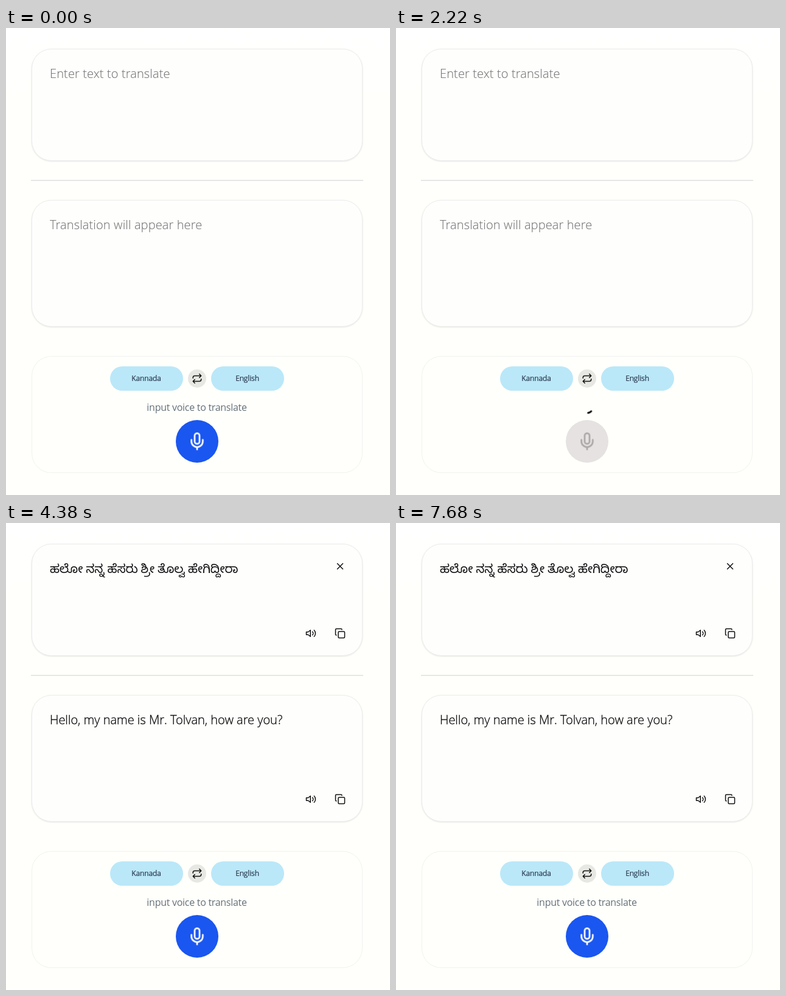
Write an HTML page that moves like this. It is 631 px wide and 766 px high and loops after 7.92 s.

```html
<!DOCTYPE html>
<html lang="en">
<head>
<meta charset="utf-8">
<title>Voice translator</title>
<style>
  html, body { margin: 0; height: 100%; overflow: hidden; background: #fffffc; }
  svg.stage { display: block; width: 631px; height: 766px; background: linear-gradient(#fff, #fffffb 160px); }
  text { font-family: "Open Sans", "Noto Sans", "Noto Sans Kannada", sans-serif; font-weight: 300; font-size: 20px; }
  .box { fill: #fefefd; stroke: #ebebec; filter: drop-shadow(0 1px 1px rgb(0 0 0 / .1)); }
  .panel { fill: none; stroke: #f1f1f0; }
  .hint { fill: #777; stroke: #777; stroke-width: .15; letter-spacing: .12px; }
  .said { fill: #111; stroke: #111; stroke-width: .35; }
  .said:lang(kn) { stroke: none; letter-spacing: -.15px; }
  .prompt { fill: #64717a; font-size: 16px; font-weight: 400; text-anchor: middle; letter-spacing: -.28px; }
  .pill { fill: #bae8f9; }
  .lang { fill: #2c3b50; stroke: #2c3b50; stroke-width: .2; font-size: 12px; font-weight: 400; text-anchor: middle; letter-spacing: -.15px; }
  .icon { fill: none; stroke: #111; stroke-width: 2; stroke-linecap: round; stroke-linejoin: round; }
  #ring { transform-origin: 314px 622px; }
</style>
</head>
<body>
<svg class="stage" viewBox="0 0 631 766">
  <defs>
    <g id="mic"><path d="M12 2a3 3 0 0 0-3 3v7a3 3 0 0 0 6 0V5a3 3 0 0 0-3-3ZM19 10v2a7 7 0 0 1-14 0v-2M12 19v3"/></g>
    <g id="micOff"><path d="M2 2 22 22M18.89 13.23A7.12 7.12 0 0 0 19 12v-2M5 10v2a7 7 0 0 0 12 5M15 9.34V5a3 3 0 0 0-5.68-1.33M9 9v3a3 3 0 0 0 5.12 2.12M12 19v3"/></g>
    <g id="swap"><path d="m17 2 4 4-4 4M3 11v-1a4 4 0 0 1 4-4h14M7 22l-4-4 4-4M21 13v1a4 4 0 0 1-4 4H3"/></g>
    <g id="speaker"><path d="M11 5 6 9H2v6h4l5 4ZM15.54 8.46a5 5 0 0 1 0 7.07M19.07 4.93a10 10 0 0 1 0 14.14"/></g>
    <g id="copy"><rect x="8" y="8" width="14" height="14" rx="2"/><path d="M4 16a2 2 0 0 1-2-2V4a2 2 0 0 1 2-2h10a2 2 0 0 1 2 2"/></g>
    <g id="close"><path d="M18 6 6 18M6 6l12 12"/></g>
  </defs>

  <rect class="box" x="42.5" y="34.5" width="543" height="183" rx="32"/>
  <rect x="41" y="249" width="546" height="2" fill="#e5e6e5"/>
  <rect class="box" x="42.5" y="282.5" width="543" height="207" rx="32"/>
  <rect class="panel" x="42.5" y="538.5" width="543" height="191" rx="32"/>

  <g id="empty">
    <text class="hint" x="72" y="82">Enter text to translate</text>
    <text class="hint" x="72" y="330">Translation will appear here</text>
  </g>
  <g id="result">
    <text class="said" x="72" y="82" lang="kn">ಹಲೋ ನನ್ನ ಹೆಸರು ಶ್ರೀ ತೊಲ್ವ ಹೇಗಿದ್ದೀರಾ</text>
    <text class="said" x="72" y="330">Hello, my name is Mr. Tolvan, how are you?</text>
    <circle id="hover" cx="501" cy="453" r="20" fill="#e3e3e1"/>
    <g id="tools"></g>
  </g>

  <rect class="pill" x="171" y="555" width="120" height="40" rx="20"/>
  <rect class="pill" x="337" y="555" width="120" height="40" rx="20"/>
  <text class="lang" x="230.5" y="579">Kannada</text>
  <text class="lang" x="396.5" y="579">English</text>
  <circle cx="314" cy="575" r="15" fill="#e7e7e3"/>
  <g id="middle"></g>

  <text id="prompt" class="prompt" x="313.5" y="628">input voice to translate</text>
  <g id="dots" fill="#111">
    <circle cx="306" cy="622" r="3"/><circle cx="314" cy="622" r="3"/><circle cx="322" cy="622" r="3"/>
  </g>
  <g id="busy">
    <g id="ring"><circle id="arc" cx="314" cy="622" r="9.5" fill="none" stroke="#111" stroke-width="3" stroke-linecap="round"/></g>
  </g>

  <circle id="button" cx="314" cy="678" r="35"/>
  <g id="micIcon"></g>
  <g id="offIcon"></g>
</svg>
<script>
const LOOP = 7920, LISTEN = 870, WAIT = 2040, DONE = 2460, HOVER = [4380, 5820];
const BLUE = '#1a56f0', RED = '#e61237', GREY = '#e5e2e1', FADE = 150;
const $ = id => document.getElementById(id);

function icon(parent, name, x, y, size = 18) {
  const use = document.createElementNS('http://www.w3.org/2000/svg', 'use');
  use.setAttribute('href', '#' + name);
  use.setAttribute('class', 'icon');
  use.setAttribute('transform', `translate(${x - size / 2} ${y - size / 2}) scale(${size / 24})`);
  $(parent).append(use);
}
icon('tools', 'close', 549, 71);
for (const y of [181, 453]) {
  icon('tools', 'speaker', 501, y);
  icon('tools', 'copy', 549, y);
}
icon('middle', 'swap', 314, 575);
icon('micIcon', 'mic', 314, 678, 32);
icon('offIcon', 'micOff', 314, 678, 32);

// steps: [time, value, easing to the next step]
function track(el, prop, steps) {
  const all = [[0, steps[0][1]], ...steps, [LOOP, steps.at(-1)[1]]];
  el.animate(all.map(([ms, value, easing = 'linear']) => ({ offset: ms / LOOP, [prop]: value, easing })),
    { duration: LOOP, iterations: Infinity });
}
const hold = (el, prop, steps) => track(el, prop, steps.map(([ms, v]) => [ms, v, 'step-end']));
const show = (el, from, to) => hold(el, 'opacity', [[0, 0], [from, 1], [to, 0]]);

hold($('empty'), 'opacity', [[0, 1], [DONE, 0]]);
hold($('result'), 'opacity', [[0, 0], [DONE, 1]]);
hold($('prompt'), 'opacity', [[0, 1], [LISTEN, 0], [DONE, 1]]);
show($('dots'), LISTEN, WAIT);
show($('busy'), WAIT, DONE);

// bouncing dots, 1050 ms a round, 100 ms apart
[...$('dots').children].forEach((dot, i) => {
  const steps = [];
  for (let k = 0; k < 2; k++) {
    const s = LISTEN + 100 * i + 1050 * k;
    steps.push([s, 'translateY(0px)', 'cubic-bezier(.33,.66,.66,1)'],
      [s + 300, 'translateY(-6px)', 'cubic-bezier(.33,0,.66,.33)'],
      [s + 600, 'translateY(0px)']);
  }
  track(dot, 'transform', steps);
});

// growing, turning arc
track($('ring'), 'transform', [[WAIT, 'rotate(0deg)'], [WAIT + 2000, 'rotate(360deg)']]);
track($('arc'), 'strokeDasharray', [[WAIT, '0 150', 'ease-in-out'], [WAIT + 712, '42 150']]);
track($('arc'), 'strokeDashoffset', [[WAIT, '0', 'ease-in-out'], [WAIT + 712, '-16']]);

track($('button'), 'fill', [[LISTEN, BLUE], [LISTEN + FADE, RED], [WAIT, RED],
  [WAIT + FADE, GREY], [DONE, GREY], [DONE + FADE, BLUE]]);
hold($('micIcon'), 'opacity', [[0, 1], [LISTEN, 0], [WAIT, 1]]);
hold($('micIcon').firstChild, 'stroke', [[0, '#fff'], [WAIT, '#aaa7a6'], [DONE, '#fff']]);
show($('offIcon'), LISTEN, WAIT);

track($('hover'), 'opacity', [[HOVER[0], 0], [HOVER[0] + FADE, 1], [HOVER[1], 1], [HOVER[1] + FADE, 0]]);
</script>
</body>
</html>
```
